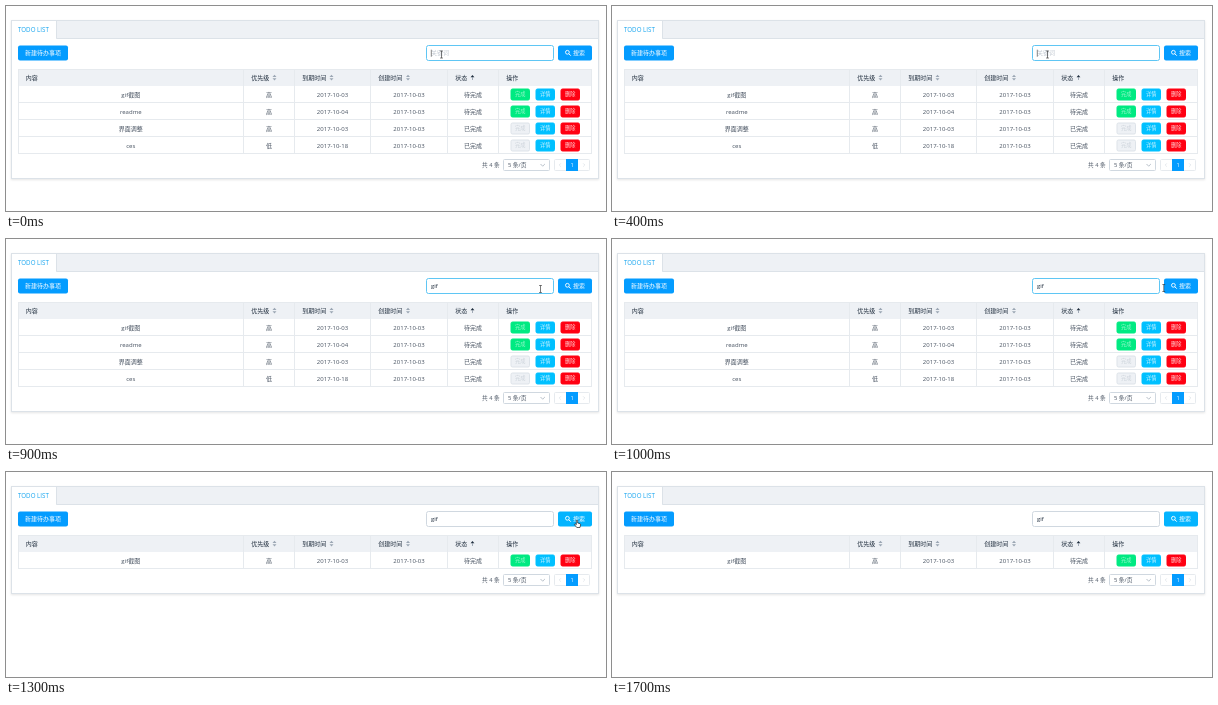
These frames come from a looping animation (600 by 205 pixels, 1800 ms). An HTML page:

```html
<!DOCTYPE html>
<html lang="zh-CN">
<head>
<meta charset="utf-8">
<title>Todo list</title>
<style>
  html, body { margin: 0; width: 100%; height: 100%; overflow: hidden; background: #fff; }
  svg { display: block; width: 100%; height: 100%;
        font: 6px "Open Sans", "Noto Sans CJK SC", "Noto Sans CJK", sans-serif; }
  #card { filter: drop-shadow(0 1px 1px rgba(0, 0, 0, .1)); }
</style>
</head>
<body>
<svg id="stage" viewBox="0 0 600 205"></svg>
<script>
const LOOP = 1800, STEP = 100;
const BLUE = '#049cff', HOVER = '#04b4ff', GREEN = '#00ea82', INFO = '#00c0ff', RED = '#ff0012';
const HEAD = '#eef1f5', LINE = '#e6eaee', EDGE = '#d0d8e0', INK = '#1f2d3d', TEXT = '#45505f', PALE = '#ccd3da';

const rows = [
  ['gif截图', '高', '2017-10-03', '2017-10-03', '待完成'],
  ['readme', '高', '2017-10-04', '2017-10-03', '待完成'],
  ['界面调整', '高', '2017-10-03', '2017-10-03', '已完成'],
  ['ces', '低', '2017-10-18', '2017-10-03', '已完成']
];
const heads = ['内容', '优先级', '到期时间', '创建时间', '状态', '操作'];
const edges = [12, 237.5, 288.5, 364.5, 441.5, 492.5, 586];
const sorts = [0, 268.5, 325.5, 402, 466.5];

const rect = (x, y, w, h, fill, stroke = 'none', r = 0) =>
  `<rect x="${x}" y="${y}" width="${w}" height="${h}" rx="${r}" fill="${fill}" stroke="${stroke}"/>`;
const path = (d, stroke, fill = 'none', w = 1) =>
  `<path d="${d}" stroke="${stroke}" fill="${fill}" stroke-width="${w}"/>`;
// y is the middle of the line of text
const text = (s, x, y, fill = TEXT, anchor = 'start', size = 6, weight = 400) =>
  `<text x="${x}" y="${y + size * .36}" fill="${fill}" text-anchor="${anchor}" font-size="${size}" font-weight="${weight}">${s}</text>`;

function button(label, x, y, fill, ink, edge = fill) {
  return rect(x + .5, y - 5.5, 18.5, 11, fill, edge, 1.5) + text(label, x + 9.8, y, ink, 'middle', 5.2);
}

function sorter(x, active) {
  return active
    ? path(`M${x - 1.9} 71.3l1.9-2.2 1.9 2.2z`, 'none', INK) + path(`M${x} 71V74`, '#8d99a8', 'none', .8)
    : path(`M${x - 2} 71l2-2.2 2 2.2zM${x - 2} 72.2l2 2.2 2-2.2z`, 'none', '#9ba6b3');
}

function table(count) {
  const bottom = 80 + 17 * count;
  let s = rect(12, 63, 574, 17, HEAD);
  heads.forEach((h, i) => {
    s += text(h, edges[i] + 7.8, 71.5, INK, 'start', 6, 500);
    if (sorts[i]) s += sorter(sorts[i], i === 4);
  });
  rows.slice(0, count).forEach((row, i) => {
    const y = 88.5 + 17 * i;
    row.forEach((cell, j) => s += text(cell, (edges[j] + edges[j + 1]) / 2, y, TEXT, 'middle'));
    s += row[4] === '已完成'
      ? button('完成', 504.5, y, HEAD, PALE, '#dde3e9')
      : button('完成', 504.5, y, GREEN, '#ffffff99');
    s += button('详情', 529.5, y, INFO, '#ffffffcc') + button('删除', 554.5, y, RED, '#ffffffdd');
    s += path(`M12 ${y + 8}H586`, LINE);
  });
  edges.slice(1, 6).forEach(x => s += path(`M${x} 63V${bottom}`, LINE));
  return s + rect(12.5, 63.5, 573, bottom - 64, 'none', LINE);
}

function pager(y) {
  return text('共 4 条', 476, y, TEXT, 'start', 5.7) +
    rect(497.5, y - 5.5, 46, 11, '#fff', EDGE, 1) + text('5 条/页', 502, y, TEXT, 'start', 5.8) +
    path(`M534.5 ${y - 1}l2.2 2.2 2.2-2.2`, '#9ba6b3', 'none', .7) +
    rect(548.5, y - 5.5, 35, 11, '#fff', LINE, 1) + rect(560, y - 6, 12, 12, BLUE) +
    text('1', 566, y, '#fff', 'middle', 5.6) +
    path(`M554.8 ${y - 1.6}l-1.6 1.6 1.6 1.6M577.2 ${y - 1.6}l1.6 1.6-1.6 1.6`, '#d3dae1', 'none', .6);
}

const cursors = {
  beam: path('M-1.4-3.5H1.4M0-3.5V3.5M-1.4 3.5H1.4', '#333', 'none', .65),
  hand: path('M-.7 0q.7-.8 1.4 0V2.5l2.3.7q.8.3.6 1.2L3 7H-.2L-2.5 4.2q0-1 1-.6l.8.6z', '#222', '#fff', .7),
  arrow: path('M0 0V6.4L1.5 5 2.5 7.2 3.5 6.8 2.5 4.7H4.5z', '#222', '#fff', .6)
};

// Cursor keys: time, shape, x, y; straight moves between them
const track = [
  [0, 'beam', 435.5, 48.5], [500, '', 435.5, 48.5], [700, 'beam', 436, 49], [900, 'beam', 534.5, 50],
  [1100, 'hand', 569, 48], [1200, 'hand', 571, 48.5], [1400, 'hand', 571, 48.5],
  [1500, 'arrow', 571, 92], [1600, 'arrow', 570, 176], [1700, '', 570, 205]
];

function pointer(t) {
  const i = track.findLastIndex(k => k[0] <= t);
  const a = track[i], b = track[i + 1] || a;
  if (!a[1]) return '';
  const p = b === a ? 0 : (t - a[0]) / (b[0] - a[0]);
  const x = a[2] + (b[2] - a[2]) * p, y = a[3] + (b[3] - a[3]) * p;
  return `<g transform="translate(${x} ${y})">${cursors[a[1]]}</g>`;
}

function search(t) {
  const typed = t < 500 ? '' : t < 600 ? 'gi' : 'gif';
  const focused = t < 1300;
  const caret = focused && (t < 900 || t >= 1100);
  const caretX = [425.3, 0, 430.3, 432.5][typed.length];
  const fill = t >= 1100 ? HOVER : BLUE;
  return rect(420.5, 39.5, 127, 15, '#fff', focused ? '#5fc6f4' : EDGE, 2) +
    text(typed || '关键词', 425, 47.2, typed ? INK : '#c0c8d1') +
    (caret ? path(`M${caretX} 43.7V50.7`, '#333', 'none', .6) : '') +
    rect(552, 39.5, 34, 15, fill, 'none', 2) +
    '<circle cx="561.4" cy="46.3" r="1.9" fill="none" stroke="#fff" stroke-width=".9"/>' +
    path('M562.8 47.7l2 2', '#fff', 'none', 1) + text('搜索', 567, 47, '#fff');
}

function scene(t) {
  const count = t < 1300 ? 4 : 1;
  const bottom = 105 + 17 * count;
  return `<g id="card">${rect(5.5, 14.5, 587, bottom - 15, '#fff', '#dce2e8')}</g>` +
    rect(50, 15, 542, 18, HEAD) + path('M50.5 15V32.5H592', '#dce2e8') +
    text('TODO LIST', 12, 23.7, '#16a5f0', 'start', 6.2) +
    rect(12, 39.5, 50, 15, BLUE, 'none', 2) + text('新建待办事项', 19, 47, '#fff') +
    search(t) + table(count) + pager(bottom - 14) + pointer(t);
}

const stage = document.getElementById('stage');
let shown = -1;
function tick(now) {
  const t = Math.floor(now % LOOP / STEP) * STEP;
  if (t !== shown) stage.innerHTML = scene(shown = t);
  requestAnimationFrame(tick);
}
tick(0);
</script>
</body>
</html>
```
